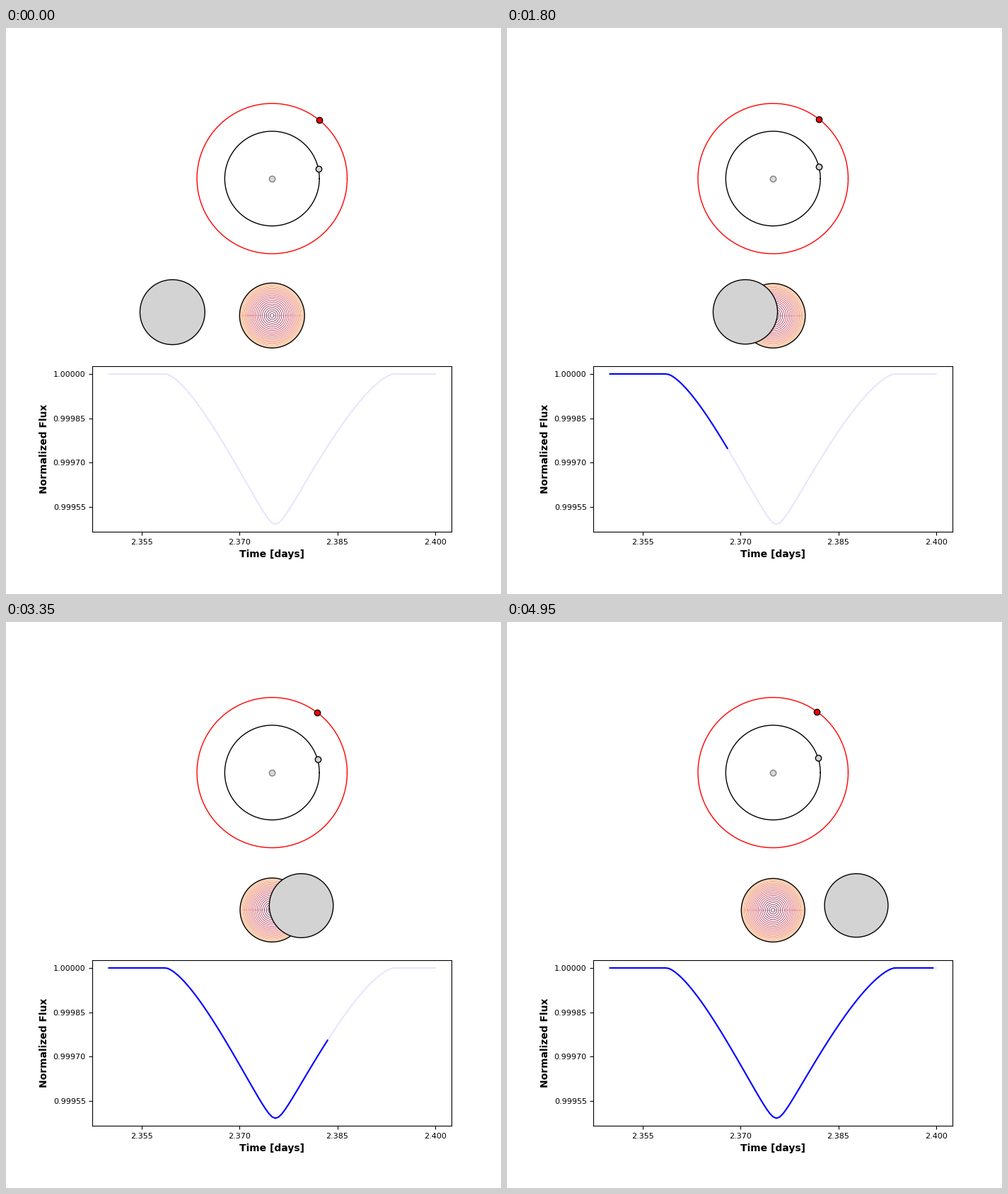
Animation, 700 px wide and 800 px high, one loop 5000 ms. Source, as a matplotlib script:

```python
import numpy as np
import matplotlib.pyplot as plt
from matplotlib.animation import FuncAnimation
from matplotlib.collections import LineCollection
from matplotlib.colors import LinearSegmentedColormap
from matplotlib.patches import Circle

W, H, DPI = 700, 800, 100
FRAMES, INTERVAL = 100, 50
DEPTH = 0.000508
LAG = 0.28      # light curve trails the discs, in steps
FILL = 1 / 1.1  # share of a panel's height left by the 5% margins

plt.rcParams["font.family"] = "DejaVu Sans"


def offset(i):
    """Occultor position relative to the occulted disc, in disc radii."""
    return -3.069 + 0.06352 * i - 6.1e-5 * i**2, 0.103 + 0.000475 * i


def overlap(i):
    """Covered fraction of the disc for two equal circles."""
    half = np.clip(np.hypot(*offset(i)) / 2, 0, 1)
    return 2 / np.pi * (np.arccos(half) - half * np.sqrt(1 - half**2))


fig = plt.figure(figsize=(W / DPI, H / DPI), dpi=DPI, facecolor="white")
grid = fig.add_gridspec(5, 1, left=0.175, right=0.9, bottom=0.11, top=0.88,
                        hspace=0.2)


def panel(rows):
    """Centre x, centre y and inner height of grid rows, in pixels from top."""
    box = grid[rows, 0].get_position(fig)
    return (W * (box.x0 + box.x1) / 2, H * (1 - (box.y0 + box.y1) / 2),
            H * box.height * FILL)


CX, ORBIT_Y, orbit_h = panel(slice(0, 2))
OUTER_R = orbit_h / 2
INNER_R = 0.63 * OUTER_R
_, DISC_Y, disc_h = panel(slice(2, 3))
DISC_TOP, DISC_BOTTOM = DISC_Y - disc_h / 2, DISC_Y + disc_h / 2


def on_orbit(radius, degrees):
    a = np.radians(degrees)
    return CX + radius * np.cos(a), ORBIT_Y - radius * np.sin(a)


# Light curve
step = np.arange(FRAMES + 1)
time = 2.35 + 0.0005 * step
covered = overlap(step - LAG)
flux = 1 - DEPTH * covered / covered.max()

ax = fig.add_subplot(grid[3:, 0])
ax.plot(time, flux, color="blue", alpha=0.1, lw=1.5)
curve, = ax.plot([], [], color="blue", lw=1.5)
ax.set_xticks([2.355, 2.370, 2.385, 2.400])
ax.set_yticks([0.99955, 0.99970, 0.99985, 1.0])
ax.xaxis.set_major_formatter("{x:.3f}")
ax.yaxis.set_major_formatter("{x:.5f}")
ax.tick_params(labelsize=8)
ax.set_xlabel("Time [days]", fontsize=10, fontweight="bold")
ax.set_ylabel("Normalized Flux", fontsize=10, fontweight="bold")

# Pixel canvas for the orbits and the discs
sky = fig.add_axes([0, 0, 1, 1])
sky.set(xlim=(0, W), ylim=(H, 0))
sky.axis("off")

turn = np.linspace(0, 360, 1000)
sky.plot(*on_orbit(INNER_R, turn), color="black", lw=1)
sky.plot(*on_orbit(OUTER_R, turn), color="red", lw=1)


def body(fill, edge="black"):
    return sky.plot([CX], [ORBIT_Y], "o", ms=6, mfc=fill, mec=edge, mew=1,
                    zorder=3)[0]


star = body("#d9d9d9", "#808080")
inner = body("lightgray")
outer = body("red")

# Occulted disc: thin rings, each made of two half arcs that meet at the sides
RINGS = 26
ring_r = np.sin(np.arange(1, RINGS) * np.pi / 2 / RINGS)
heat = LinearSegmentedColormap.from_list("heat", [
    (0, "#5c1a3c"), (0.3, "#96204a"), (0.6, "#d0404f"),
    (0.85, "#f0906a"), (0.95, "#f9c39b"), (1, "#fbd6b6")])
rings = LineCollection([], colors=np.repeat(heat(ring_r), 2, axis=0),
                       linewidths=0.55, capstyle="projecting", zorder=4)
sky.add_collection(rings, autolim=False)


def disc(fill, z):
    return sky.add_patch(Circle((CX, DISC_Y), 45, facecolor=fill,
                                edgecolor="black", lw=1, zorder=z))


occulted = disc("none", 5)
occultor = disc("lightgray", 6)


def half_arcs(cy, radius):
    arcs = []
    for r in ring_r * radius:
        over = 0.5 / r
        for start in (0, np.pi):
            a = np.linspace(start - over, start + np.pi + over, 60)
            arcs.append(np.column_stack([CX + r * np.cos(a),
                                         cy + r * np.sin(a)]))
    return arcs


def draw(i):
    dx, dy = offset(i)
    radius = (DISC_BOTTOM - DISC_TOP) / (2 + dy)
    cy = DISC_BOTTOM - radius
    occulted.set(center=(CX, cy), radius=radius)
    occultor.set(center=(CX + dx * radius, DISC_TOP + radius), radius=radius)
    rings.set_segments(half_arcs(cy, radius))

    p = i / (FRAMES - 1)
    for dot, r, a in ((inner, INNER_R, 12.1 + 5.8 * p),
                      (outer, OUTER_R, 51.05 + 3.25 * p)):
        x, y = on_orbit(r, a)
        dot.set_data([x], [y])

    n = i + 1 if i else 0
    curve.set_data(time[:n], flux[:n])
    return curve, inner, outer, rings, occulted, occultor


anim = FuncAnimation(fig, draw, frames=FRAMES, interval=INTERVAL,
                     repeat=True, repeat_delay=0, blit=False)
plt.show()
```
